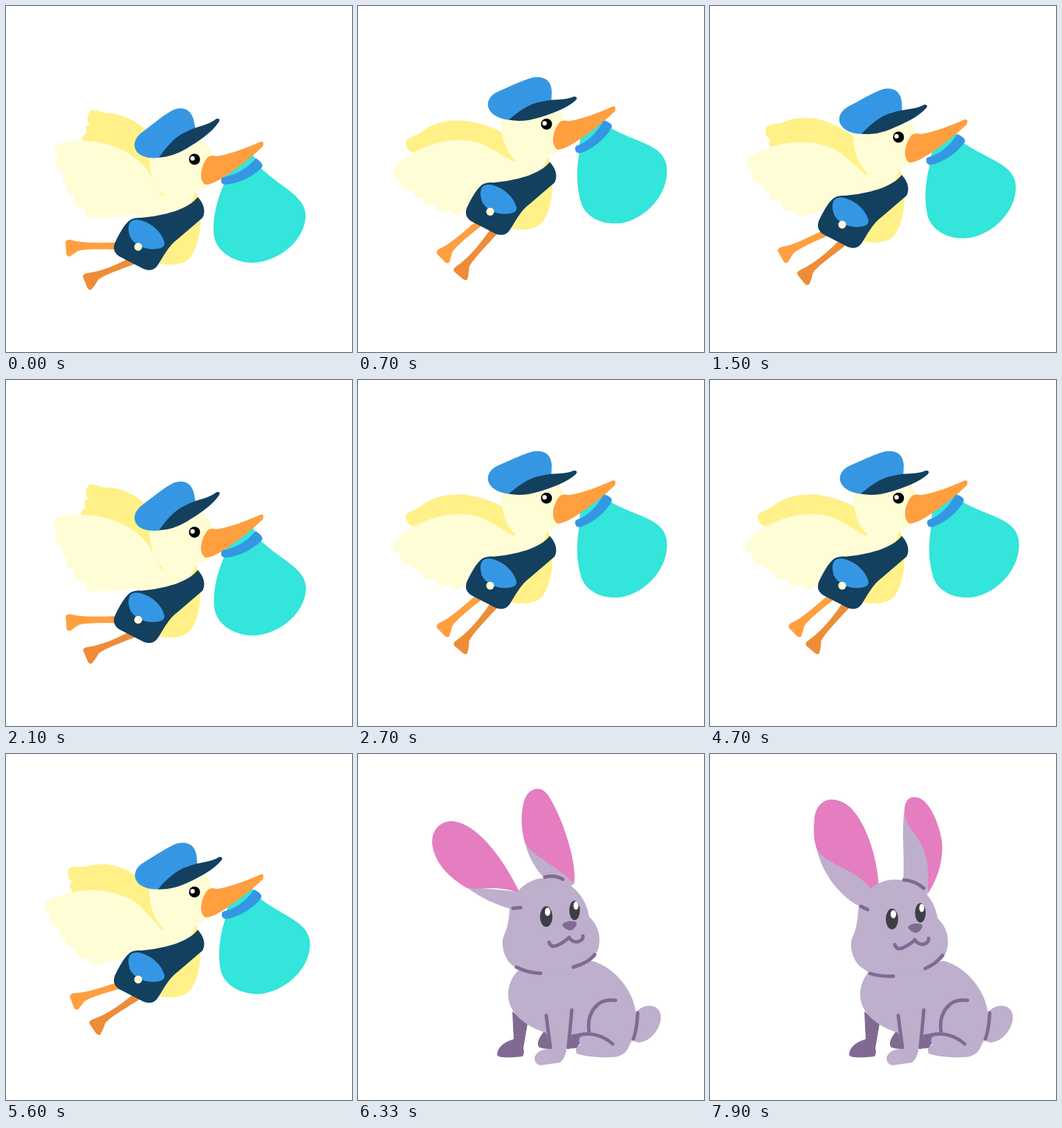
An HTML page that plays this animation: 500 by 500 pixels, repeating every 8000 ms.

```html
<!DOCTYPE html>
<html lang="en">
<head>
<meta charset="utf-8">
<title>Stork and rabbit</title>
<style>
  html, body { margin: 0; width: 100%; height: 100%; overflow: hidden; background: #fff; }
  svg { display: block; width: 100vw; height: 100vh; }
  .cream { fill: #fffdd6; }
  .yellow { fill: #fff188; }
  .blue { fill: #3597e3; }
  .navy { fill: #13405f; }
  .orange { fill: #ff9f40; }
  .rust { fill: #ee8c37; }
  .teal { fill: #33e5da; }
  .lilac { fill: #beafcc; }
  .plum { fill: #806a93; }
  .pink { fill: #e47ec0; }
  .ink { fill: #3c3e47; }
  .line { fill: none; stroke: #806a93; stroke-width: 5; stroke-linecap: round; stroke-linejoin: round; }
</style>
</head>
<body>
<svg viewBox="0 0 500 500">
  <g id="stork">
    <path id="backWing" class="yellow" d="M122 151C132 148 140 156 148 155C180 157 208 176 230 216C245 245 245 275 235 284L150 260L112 197Q108 192 112 187Q118 184 116 180Q113 174 121 170C116 165 117 158 122 151Z"/>
    <path id="backLeg" class="rust" d="M198 354L205 366L183 374C161 382 139 390 133 396Q128 405 123 410Q119 411 117 406L111 391Q111 387 118 386C140 383 160 374 181 363Z"/>
    <path id="frontLeg" class="orange" d="M195 341L195 351L157 352C135 351 112 351 104 354L92 362Q87 362 87 357L86 341Q87 337 94 338C110 343 135 342 157 342Z"/>
    <path class="yellow" d="M264 264Q279 266 276 280L281 300C282 325 277 350 266 364C256 375 235 376 218 371L200 340Z"/>
    <path class="cream" d="M208 232C204 208 212 186 250 182C279 182 293 198 298 215L300 250Q293 262 278 267C270 270 273 276 267 285L222 315L180 320L188 300L228 274C215 262 210 248 208 232Z"/>
    <path id="frontWing" class="cream" d="M71 205Q71 199 80 197C125 188 180 203 205 238Q217 259 229 283L204 294C180 304 155 307 128 305Q113 308 115 294C104 291 92 287 101 273C90 274 82 265 90 257C80 257 82 246 83 240C71 236 69 228 76 217Q68 212 71 205Z"/>
    <path class="navy" d="M277 276C288 288 288 299 284 306L249 336C233 348 228 362 219 375Q212 385 199 380L164 362Q153 355 157 343C164 328 170 318 176 312Q182 305 196 306C228 303 264 294 277 276Z"/>
    <path class="blue" d="M179 313Q183 308 192 309C211 313 225 327 229 342Q230 347 223 350C204 355 185 346 179 333Q175 320 179 313Z"/>
    <circle class="cream" cx="191" cy="348" r="5.7"/>
    <g id="bundle">
      <path class="teal" d="M316 255C305 280 299 303 300 327C301 353 327 370 354 371C394 371 433 338 433 302C432 274 398 263 367 233Z"/>
      <path class="teal" d="M317 249L324 232L350 212Q359 214 361 224L340 242Z"/>
      <path class="blue" d="M311 249Q309 258 318 258C340 256 360 244 370 233Q373 228 361 220C350 233 335 243 319 246Q312 246 311 249Z"/>
    </g>
    <path class="orange" d="M292 218C281 230 278 252 288 258C300 261 345 228 371 203Q374 195 368 196C345 206 322 215 304 217Q297 215 292 218Z"/>
    <circle cx="272.4" cy="221.5" r="8"/>
    <circle cx="269.6" cy="220.3" r="3.2" fill="#fff"/>
    <g id="hat">
      <path class="blue" d="M198 217C182 210 182 194 196 183C212 171 228 157 242 150C257 145 267 150 271 164L274 178L222 219Q208 221 198 217Z"/>
      <path class="navy" d="M221 219C231 205 243 189 260 182C276 173 292 173 304 163Q310 162 308 167C298 183 277 196 261 206Q241 218 221 219Z"/>
    </g>
  </g>

  <g id="rabbit">
    <path class="plum" d="M223 372L225 412C209 417 201 425 201 435Q204 441 238 437Q241 432 239 425L245 390ZM270 400C262 408 257 419 262 424Q270 427 281 426L282 400ZM304 395L301 426L316 425L332 402Z"/>
    <path class="lilac" d="M403 373C410 362 432 359 437 375C441 392 425 416 405 417Q395 416 398 405Q403 390 403 373Z"/>
    <path class="lilac" d="M235 310C222 320 217 335 217 348C217 372 238 392 272 403L278 426Q257 427 255 440Q256 449 264 450L291 446Q299 442 302 424L306 406L328 402C318 409 318 416 322 420Q312 424 316 433C330 438 360 440 376 437Q389 433 393 419C400 408 402 398 402 380C401 345 372 308 338 299Z"/>
    <path class="line" d="M404 374Q404 393 398 412M372 356C345 352 330 375 334 402M313 411C325 400 350 403 368 419M272 378L278 424M309 370L304 424"/>

    <g id="earsBack">
      <g id="leftEar">
        <path class="lilac" d="M156 192C178 209 205 220 222 224L250 215L234 199Z"/>
        <path class="pink" d="M234 201C215 160 175 100 136 97C115 97 104 115 108 135C113 158 130 178 158 194C180 196 205 190 234 201Z"/>
      </g>
      <g id="rightEar">
        <path class="lilac" d="M241 126C246 150 258 168 270 180L306 192L313 187Z"/>
        <path class="pink" d="M312 187C318 160 295 90 275 60C265 45 248 48 241 65C234 85 236 110 241 128C252 147 285 160 312 187Z"/>
      </g>
    </g>
    <g id="earsUp">
      <path class="lilac" d="M153 133C162 175 190 208 218 221L250 222L244 192Z"/>
      <path class="pink" d="M244 192C242 150 225 95 199 74C178 59 155 64 151 92C149 112 150 125 154 136C165 160 205 162 232 194Q238 199 244 192Z"/>
      <path class="lilac" d="M281 80C276 115 282 150 279 185L313 205L322 150Z"/>
      <path class="pink" d="M314 203C330 180 338 150 335 125C330 95 315 66 300 63C288 60 281 68 281 82C283 120 324 118 314 203Z"/>
    </g>
    <path id="head" class="lilac" d="M219 225C222 200 245 179 272 179C305 179 330 205 334 235C347 247 351 263 348 278C344 298 325 308 300 314C270 322 240 320 227 308C212 300 205 275 211 262Q218 248 219 225Z"/>
    <path id="linesBack" class="line" d="M224 223L235 222M270 178Q283 174 296 181M229 308Q244 316 264 317M342 290Q334 301 311 308"/>
    <path id="linesUp" class="line" d="M218 220L228 225M280 182Q296 183 309 194M231 317Q246 322 265 321M336 291Q327 303 311 310"/>
    <g id="face">
      <ellipse class="ink" cx="272" cy="235" rx="9" ry="15"/>
      <ellipse class="ink" cx="313" cy="226" rx="7.7" ry="14"/>
      <ellipse cx="274" cy="228" rx="4" ry="6" fill="#fff"/>
      <ellipse cx="315" cy="219" rx="3.6" ry="6" fill="#fff"/>
      <path class="plum" d="M295 247C298 241 313 240 316 244C316 250 310 255 306 255Q298 253 295 247Z"/>
      <path class="line" d="M276 272Q279 281 289 276Q298 272 305 265Q310 273 319 271Q326 268 325 263"/>
    </g>
  </g>
</svg>
<script>
const LOOP = 8000, RABBIT_START = 6000, STEP = 100;
const $ = id => document.getElementById(id);
const show = (id, on) => $(id).style.display = on ? '' : 'none';
const move = (id, x, y) => $(id).setAttribute('transform', `translate(${x} ${y})`);
const turn = (id, angle, x, y, sink = 0) =>
  $(id).setAttribute('transform', `translate(0 ${sink}) rotate(${angle} ${x} ${y})`);

function drawStork(t) {
  const lift = 1 - Math.cos(Math.floor(t / STEP) * STEP * Math.PI / 1000);
  move('stork', 0, -32 * lift);
  turn('hat', 9 * lift, 234, 205);
  turn('bundle', -9 * lift, 340, 242);
  turn('frontWing', -20 * lift, 208, 283, 3 * lift);
  turn('backWing', -25.5 * lift, 219, 269, 3 * lift);
  turn('frontLeg', -25.5 * lift, 192, 337);
  turn('backLeg', -17 * lift, 215, 355);
}

// The ears trail behind the turning head, then snap upright.
function drawRabbit(t) {
  const up = t >= 6470;
  const droop = t < 6100 ? -17 : t < 6230 ? -19 : t < 6330 ? -17 : 0;
  for (const part of ['ears', 'lines']) {
    show(part + 'Back', !up);
    show(part + 'Up', up);
  }
  turn('leftEar', droop, 228, 212);
  turn('rightEar', droop, 290, 184);
  move('head', up ? -5 : 0, up ? 2.5 : 0);
  move('face', up ? -9 : 0, up ? 3.5 : 0);
}

function draw(now) {
  const t = now % LOOP, rabbit = t >= RABBIT_START;
  show('stork', !rabbit);
  show('rabbit', rabbit);
  (rabbit ? drawRabbit : drawStork)(t);
}

const start = performance.now();
function tick() {
  draw(performance.now() - start);
  requestAnimationFrame(tick);
}
tick();
</script>
</body>
</html>
```
